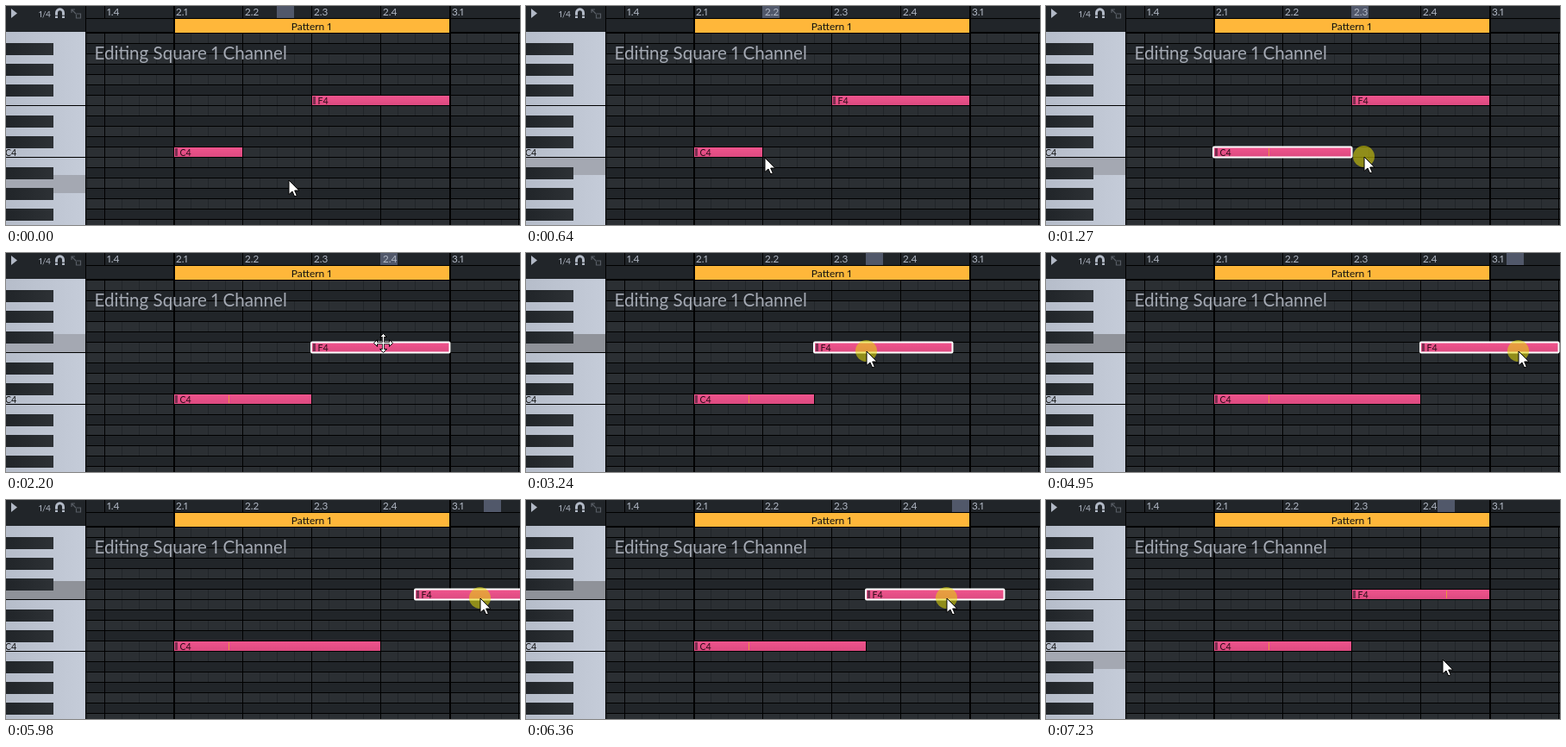
An HTML page that plays this animation: 596x254 px, repeating every 7380 ms.

```html
<!DOCTYPE html>
<html lang="en">
<head>
<meta charset="utf-8">
<title>Piano roll</title>
<style>
html, body { margin: 0; width: 100%; height: 100%; overflow: hidden; background: #212529; }
svg { display: block; width: 596px; height: 254px; font-family: Lato, "Open Sans", sans-serif; font-variant-numeric: proportional-nums; }
</style>
</head>
<body>
<svg id="stage" viewBox="0 0 596 254">
  <defs>
    <linearGradient id="ivory"><stop stop-color="#b6bdca"/><stop offset="1" stop-color="#c5ccd9"/></linearGradient>
    <linearGradient id="ebony"><stop stop-color="#212529"/><stop offset="1" stop-color="#2d3135"/></linearGradient>
    <linearGradient id="pink" x2="0" y2="1"><stop stop-color="#f0548d"/><stop offset="1" stop-color="#dc4a80"/></linearGradient>
  </defs>
</svg>
<script>
const stage = document.getElementById('stage');

function set(el, attrs) {
  for (const name in attrs) el.setAttribute(name, attrs[name]);
}
function add(tag, attrs, parent = stage) {
  const el = document.createElementNS('http://www.w3.org/2000/svg', tag);
  set(el, attrs);
  return parent.appendChild(el);
}
const rect = (x, y, width, height, fill, parent) => add('rect', { x, y, width, height, fill }, parent);
const path = (d, attrs, parent) => add('path', { d, ...attrs }, parent);
function text(x, y, size, fill, content, parent) {
  const el = add('text', { x, y, 'font-size': size, fill }, parent);
  el.textContent = content;
  return el;
}
const show = (el, on) => el.setAttribute('visibility', on ? 'visible' : 'hidden');

const LOOP = 7380, WIDTH = 596, HEIGHT = 254;
const ROW = 12, STEP = 20, BEAT = 4 * STEP, TOP = 31, GRID_X = 92, BAR_X = 194;
const DARK = '#212529', LIGHT = '#b2b9c6', BLACK = '#000';
const rowTops = Array.from({ length: 19 }, (_, row) => TOP + row * ROW);

// Rows run down from B, so the pattern of sharps flips between F and E.
const isSharp = row => (row % 12 < 7) === (row % 2 === 1);

// Grid
rowTops.forEach((y, row) => rect(GRID_X, y, WIDTH, ROW, isSharp(row) ? DARK : '#2b2f33'));
for (let x = BAR_X - 5 * STEP; x < WIDTH; x += STEP) {
  rect(x, TOP, 1, HEIGHT, (x - BAR_X) % BEAT ? DARK : BLACK);
}
for (const y of rowTops) rect(GRID_X, y, WIDTH, 1, BLACK);

// Ruler and pattern bar
rect(0, 0, WIDTH, TOP, DARK);
const rulerMarks = Array.from({ length: 6 }, (_, i) => BAR_X + (i - 1) * BEAT);
for (const x of rulerMarks) rect(x, 0, 1, 14, BLACK);
const rulerCell = rect(0, 0, STEP, 14, '#51586a');
rulerMarks.forEach((x, i) => text(x + 3, 11, 11.8, LIGHT, `${1 + Math.floor((i + 3) / 4)}.${(i + 3) % 4 + 1}`));
for (const y of [14, 30]) rect(GRID_X, y, WIDTH, 1, BLACK);
for (const x of [BAR_X, BAR_X + 4 * BEAT]) rect(x, 0, 2, HEIGHT, BLACK);
rect(BAR_X + 2, 15, 4 * BEAT - 2, 16, '#ffb73a');
text(354, 27.5, 12, '#111', 'Pattern 1').setAttribute('text-anchor', 'middle');
text(102.5, 62, 20.6, '#a4a9b3', 'Editing Square 1 Channel');

// Toolbar
rect(0, 0, GRID_X, 30, DARK);
path('M6 3L13 8.5L6 14Z', { fill: LIGHT });
text(38, 13, 10, LIGHT, '1/4');
path('M58.5 14V8a4 4.2 0 0 1 8 0V14', { fill: 'none', stroke: LIGHT, 'stroke-width': 3 });
path('M56.5 11.2h4M64.5 11.2h4', { stroke: DARK });
path('M76 8V4h4M76.5 4.5l5 5M82 9h4.5v5h-5v-4', { fill: 'none', stroke: '#575c64', 'stroke-width': 1.2 });

// Keyboard
rect(0, 30, GRID_X, HEIGHT, 'url(#ivory)');
const litKey = rect(0, 0, GRID_X, 21, '#a4a8b2');
rowTops.forEach((y, row) => isSharp(row) && rect(0, y, 55, 14, 'url(#ebony)'));
for (const row of [7, 12]) rect(0, rowTops[row], GRID_X, 1, BLACK);
rect(GRID_X, 0, 1, HEIGHT, BLACK);
text(-1, 174, 10.5, '#111', 'C4');

function makeNote(label, y) {
  const group = add('g', {});
  const edge = rect(0, y, 0, 12, BLACK, group);
  const body = rect(1, y + 1, 0, 11, 'url(#pink)', group);
  rect(2, y + 2, 3, 9, '#7a2f50', group);
  text(7.5, y + 10.5, 10.5, '#2a0d18', label, group);
  const frame = add('rect', { x: 0, y: y + 0.5, height: 12, rx: 1, fill: 'none', stroke: '#fff', 'stroke-width': 2 }, group);
  const tick = rect(0, y + 2, 1, 9, '#e8963c', group);
  return {
    place(x, width, outlined, tickX) {
      group.setAttribute('transform', `translate(${x} 0)`);
      edge.setAttribute('width', width + 1);
      body.setAttribute('width', width - 1);
      frame.setAttribute('width', width + 0.5);
      show(frame, outlined);
      tick.setAttribute('x', tickX || 0);
      show(tick, tickX);
    }
  };
}
const lowNote = makeNote('C4', 163);
const highNote = makeNote('F4', 103);

// Pointers, each with its hot spot at 0,0
const pointer = add('g', {});
const press = add('circle', { cx: -0.5, cy: -0.5, r: 12.5, fill: '#e3da06', 'fill-opacity': 0.55 }, pointer);
const outline = { fill: '#fff', stroke: '#000', 'stroke-width': 1, 'stroke-linejoin': 'round' };
const doubleArrow = 'M-11 0L-7 -4V-1H7V-4L11 0L7 4V1H-7V4Z';
const cursors = {
  arrow: path('M0 0V16.5L4 13L6.7 19L9.3 17.8L6.7 12H11.8Z', outline, pointer),
  resize: path(doubleArrow, outline, pointer),
  move: add('g', { transform: 'translate(.5 .5)' }, pointer)
};
for (const turn of [0, 90]) path(doubleArrow, { ...outline, transform: `rotate(${turn})` }, cursors.move);
path('M-7 0H7M0 -7V7', { stroke: '#fff', 'stroke-width': 1.4 }, cursors.move);

// The hand's stops; a higher slowdown brakes harder towards the end.
const home = { x: 328, y: 202 };
const moves = [
  { start: 70, end: 720, x: 271, y: 173 },
  { start: 950, end: 1650, x: 428, y: 177, slowdown: 1.4 },
  { start: 1730, end: 1810, x: 431, y: 170 },
  { start: 2040, end: 2200, x: 437, y: 104 },
  { start: 2280, end: 2690, x: 441, y: 114 },
  { start: 2910, end: 3550, x: 359, y: 114 },
  { start: 3850, end: 4550, x: 490, y: 114 },
  { start: 4630, end: 5270, x: 562, y: 114, slowdown: 2 },
  { start: 5980, end: 6680, x: 439, y: 114 },
  { start: 6760, end: 7230, x: 460, y: 185 }
];
const TICK = 80, GRAB_LOW = moves[0].x, GRAB_HIGH = moves[4].x;

function positionAt(time) {
  const index = moves.findLastIndex(move => time >= move.start - 1);
  if (index < 0) return home;
  const { start, end, x, y, slowdown = 1 } = moves[index];
  const from = moves[index - 1] || home;
  const intervals = Math.round((end - start) / TICK);
  const step = Math.floor((time - start) / (end - start) * intervals + 0.15) + 1;
  const done = 1 - (1 - Math.min(1, step / (intervals + 1))) ** slowdown;
  return { x: from.x + (x - from.x) * done, y: from.y + (y - from.y) * done };
}

const snap = distance => Math.trunc(distance / STEP) * STEP;
const between = (value, low, high) => value >= low && value < high;

// An octave has four keys of 21 px (B to F), then three of 20 px (E to C).
function whiteKeyAt(y) {
  const octave = TOP + Math.floor((y - TOP) / 144) * 144;
  const upper = y - octave < 84;
  const first = upper ? octave : octave + 84;
  const height = upper ? 21 : 20;
  return { y: first + Math.floor((y - first) / height) * height, height };
}

function render(time) {
  const { x, y } = positionAt(time);
  const stretching = between(time, 950, 1730);
  const dragging = between(time, 2910, 6720);
  const held = stretching || dragging;
  // A dragged note trails the hand by one tick.
  const heldX = dragging ? positionAt(time - TICK).x : x;

  const highX = BAR_X + 2 * BEAT + (dragging ? snap(heldX - GRAB_HIGH) : 0);
  const stretch = time < 950 ? 0 : stretching ? snap(x - GRAB_LOW) : 2 * BEAT;
  const lowWidth = Math.min(BEAT + stretch, highX - BAR_X);
  const overHigh = between(y, 103, 116) && between(x, highX, highX + 2 * BEAT);
  const overLow = between(y, 163, 175) && between(x, BAR_X, BAR_X + lowWidth);

  lowNote.place(BAR_X, lowWidth, overLow || between(time, 950, 2040), lowWidth > BEAT && 64);
  highNote.place(highX, 2 * BEAT, overHigh || dragging, time > 6750 && 110);

  rulerCell.setAttribute('x', BAR_X + Math.floor((heldX - BAR_X) / STEP) * STEP);
  set(litKey, { ...whiteKeyAt(y), fill: dragging ? '#8f9299' : '#a4a8b2' });

  let kind = 'arrow';
  if (!held && overHigh) kind = 'move';
  else if (!held && overLow) kind = x > BAR_X + lowWidth - 12 ? 'resize' : 'move';
  for (const name in cursors) show(cursors[name], name === kind);
  show(press, held);
  pointer.setAttribute('transform', `translate(${Math.round(x)} ${Math.round(y)})`);
}

const begin = performance.now();
function tick(now) {
  render(Math.max(0, now - begin) % LOOP);
  requestAnimationFrame(tick);
}
render(0);
requestAnimationFrame(tick);
</script>
</body>
</html>
```
